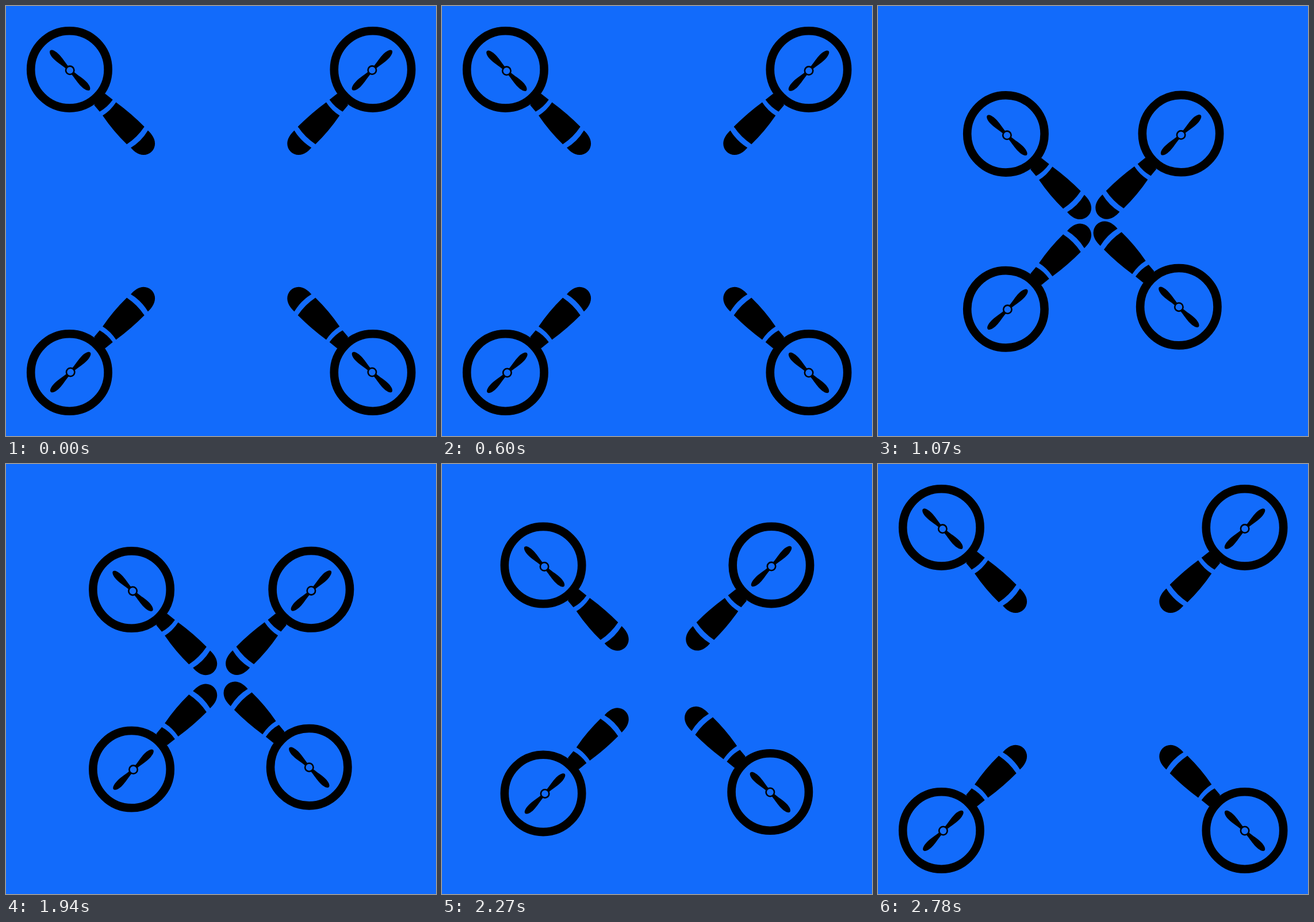
An HTML page that plays this animation: 748x748 px, repeating every 2.81 s.

```html
<!DOCTYPE html>
<html lang="en">
<head>
<meta charset="utf-8">
<title>Magnifier drone</title>
<style>
  html, body { margin: 0; height: 100%; overflow: hidden; background: #126bfb; }
  svg { display: block; width: 100vw; height: 100vh; }
</style>
</head>
<body>
<svg id="stage" viewBox="0 0 748 748">
  <defs>
    <g id="glass">
      <circle r="67.2" fill="none" stroke="#000" stroke-width="14.6"/>
      <path d="M49 49L43 62L52.5 73.3Q66 66 75.3 52.7L62 42Z"/>
      <path d="M57.7 80Q71.5 71.5 81 57Q107 76 130.3 99.5Q118 118 99.7 130Q76 107 57.7 80Z"/>
      <path d="M106.7 136Q125 125 136.5 106C144 113 148.7 121 148.7 129A19.7 19.7 0 0 1 129 148.7C121 148.7 113 143.5 106.7 136Z"/>
    </g>
    <path id="blade" d="M6 -2.8C17 -3.5 24 -6 34 -6C43 -6 48.6 -3 48.6 0C48.6 3.5 42 6 34 6C24 6 17 4 6 2.8Z"/>
    <g id="prop">
      <use href="#blade"/>
      <use href="#blade" transform="rotate(180)"/>
      <circle r="7.2" fill="#126bfb" stroke="#000" stroke-width="2.6"/>
    </g>
  </defs>
</svg>
<script>
const LOOP = 2810, STEP = 30;

// x, y: lens centre; px, py: spin pivot; dx, dy: travel to the middle
const arms = [
  { x: 110.4, y: 110.4, px: 111.8, py: 112.3, dx: 112, dy: 112, spin: 1 },
  { x: 638, y: 110.4, px: 637.5, py: 112.1, dx: -111, dy: 111.7, spin: -1 },
  { x: 110.4, y: 637.5, px: 112.8, py: 637.5, dx: 112, dy: -110.2, spin: 1 },
  { x: 638, y: 637.5, px: 637.5, py: 637.5, dx: -114.7, dy: -114.3, spin: -1 }
];

function add(parent, tag, attrs = {}) {
  const el = document.createElementNS("http://www.w3.org/2000/svg", tag);
  for (const name in attrs) el.setAttribute(name, attrs[name]);
  return parent.appendChild(el);
}

for (const arm of arms) {
  const sx = arm.x < 374 ? 1 : -1, sy = arm.y < 374 ? 1 : -1;
  arm.tilt = 45 * sx * sy;
  arm.group = add(stage, "g");
  add(arm.group, "use", { href: "#glass", transform: `translate(${arm.x} ${arm.y}) scale(${sx} ${sy})` });
  arm.prop = add(arm.group, "use", { href: "#prop" });
}

// Number of whole steps since start, from 0 to count
const steps = (t, start, count) =>
  Math.max(0, Math.min(count, Math.floor((t - start) / STEP + 1e-6)));

function draw(now) {
  const t = now % LOOP;
  const turn = steps(t, 0, 20) * 27;
  const near = steps(t, 770, 10) / 10 * (t >= 800) - steps(t, 1910, 29) / 29;
  for (const a of arms) {
    a.group.setAttribute("transform", `translate(${a.dx * near} ${a.dy * near})`);
    // The hub sits slightly off its pivot
    a.prop.setAttribute("transform",
      `translate(${a.px} ${a.py}) rotate(${a.spin * turn}) translate(-.6 -.5) rotate(${a.tilt})`);
  }
  requestAnimationFrame(draw);
}
draw(0);
</script>
</body>
</html>
```
